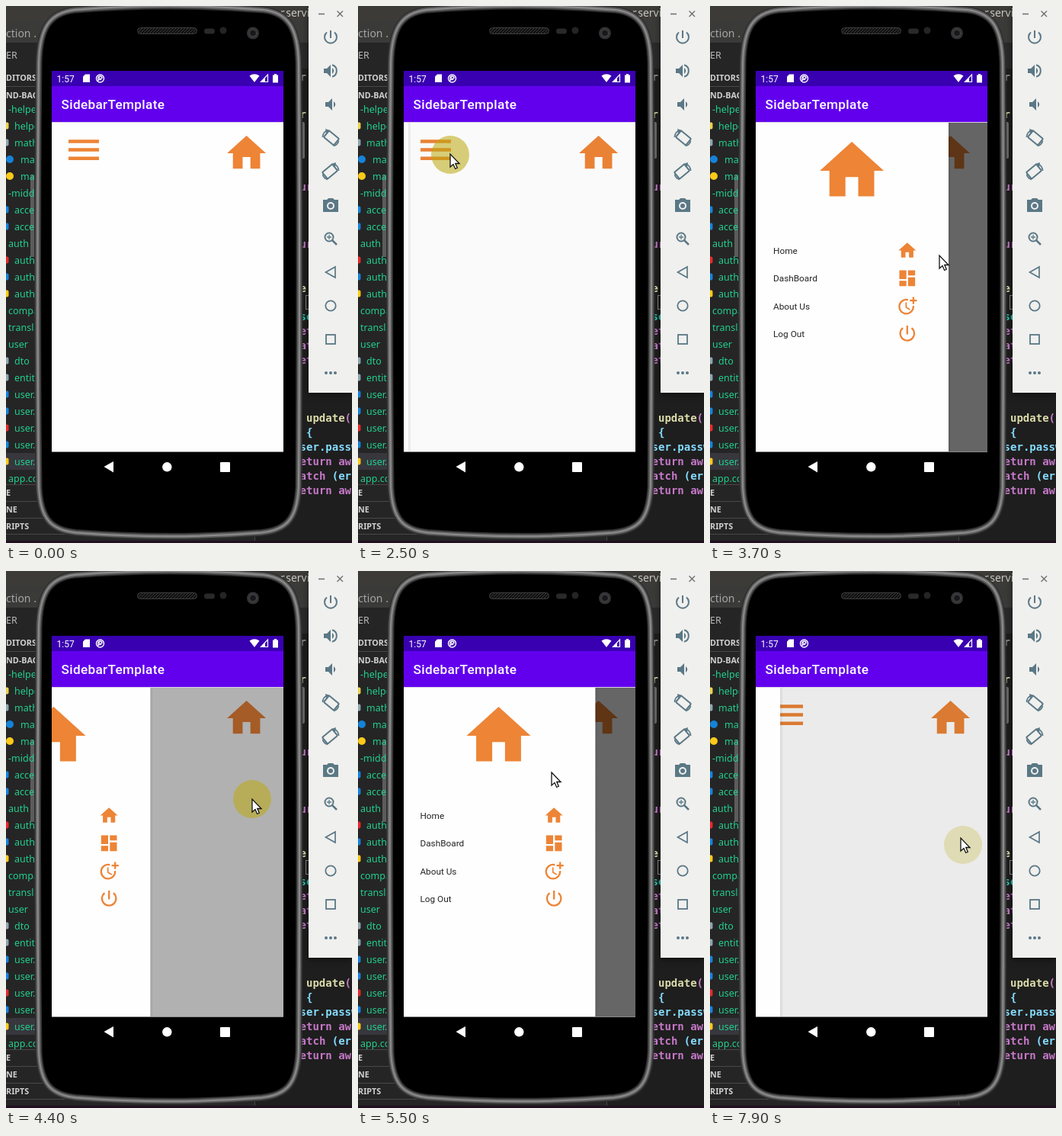
An HTML page that plays this animation: 454x704 px, repeating every 8 s.

```html
<!DOCTYPE html>
<html lang="en">
<head>
<meta charset="utf-8">
<title>Sidebar demo</title>
<style>
html, body { margin: 0; width: 100%; height: 100%; overflow: hidden; background: #1e1e1e; }
svg { display: block; }
text { white-space: pre; }
.tree { font: 12.5px "Noto Sans", "Open Sans", sans-serif; fill: #22d08c; }
.head { font: bold 10.8px "Noto Sans", "Open Sans", sans-serif; fill: #d0d0d0; }
.bar { font: 14px "Noto Sans", "Open Sans", sans-serif; fill: #a5a5a2; }
.code { font: bold 14px "DejaVu Sans Mono", monospace; }
.app { font: 11.8px Roboto, sans-serif; fill: #242424; }
.tool { fill: none; stroke: #5b7886; stroke-width: 2; }
.tool .solid { fill: #5b7886; stroke: none; }
.orange { fill: #ed8436; }
#toolbar { filter: drop-shadow(0 2px 5px rgba(0, 0, 0, .5)); }
</style>
</head>
<body>
<svg width="454" height="704" viewBox="0 0 454 704">
  <defs>
    <clipPath id="page"><rect x="60" y="152" width="304" height="432"/></clipPath>
    <linearGradient id="shade">
      <stop offset="0" stop-opacity=".1"/><stop offset="1" stop-opacity="0"/>
    </linearGradient>
    <pattern id="mesh" width="4" height="4" patternUnits="userSpaceOnUse">
      <rect width="4" height="4" fill="#111"/><path d="M0 4L4 0" stroke="#3c3c3c"/>
    </pattern>
    <path id="home" d="M10 20v-6h4v6h5v-8h3L12 3 2 12h3v8z"/>
    <path id="body" d="M43 75C44 30 56 9 90 5Q214-5 338 5C371 9 383 30 384 75Q386 350 384 630C382 674 367 687 335 690.500Q214 700 92 690.500C60 687 45 674 43 630Q40 350 43 75Z"/>
  </defs>

  <g id="editor">
    <rect width="454" height="704" fill="#1e1e1e"/>
    <rect y="48" width="327" height="656" fill="#252526"/>
    <rect width="454" height="20" fill="#3c3b37"/>
    <rect y="20" width="454" height="28" fill="#3a3a39"/>
    <rect x="327" y="48" width="127" height="34" fill="#2a2a2b"/>
    <rect y="586" width="327" height="22" fill="#37373d"/>
    <path d="M0 105.500H60M0 627.500H60M0 649.500H60M0 671.500H60M0 692.500H327" stroke="#484848"/>
    <path d="M326.500 690V701" stroke="#444"/>
    <rect y="701" width="454" height="3" fill="#21101f"/>
    <rect x="32" y="222" width="5" height="107" fill="#5c5c5c"/>
    <text class="bar" x="352" y="14" style="fill:#c9c7c2">er.service</text>
    <text class="bar" x="0" y="41">ction .</text>
    <rect x="393.500" y="379.500" width="9" height="18" fill="none" stroke="#888"/>
  </g>

  <g id="phone">
    <rect x="386" y="152" width="6" height="48" rx="2" fill="#686868"/>
    <use href="#body"/>
    <g fill="none">
      <use href="#body" stroke="#303030" stroke-width="9"/>
      <use href="#body" stroke="#626262" stroke-width="5.500"/>
      <use href="#body" stroke="#8c8c8c" stroke-width="2"/>
    </g>
    <rect x="172.500" y="28.500" width="78" height="8" rx="4" fill="url(#mesh)" stroke="#3d3d3d"/>
    <rect x="260" y="29.500" width="14" height="7" rx="3.500" fill="#292929"/>
    <circle cx="285" cy="32" r="4.500" fill="#242424"/>
    <circle cx="324" cy="35.500" r="8" fill="#333"/>
    <circle cx="324" cy="35.500" r="4.500" fill="#17191c" stroke="#4c4c4c"/>
    <rect x="60" y="85" width="304" height="20" fill="#3900b1"/>
    <rect x="60" y="105" width="304" height="47" fill="#6200ee"/>
    <rect x="60" y="152" width="304" height="432" fill="#fefefe"/>
    <g fill="#fff">
      <text x="66.500" y="99.500" font-family="Roboto, sans-serif" font-size="12">1:57</text>
      <path d="M104 89.500h6v10.500h-9v-7.500z"/>
      <circle cx="123.500" cy="95" r="5" fill="none" stroke="#fff" stroke-width="1.400"/>
      <path d="M121 97.500v-3a2.500 2.500 0 0 1 5 0l-2 1zM121 93l4 4" fill="none" stroke="#fff" stroke-width="1.300"/>
      <path d="M319.500 91.500Q326 87 332.500 91.500L326 100Z"/>
      <path d="M334.500 99.500L343.500 90V99.500Z" fill="none" stroke="#fff" stroke-width="1.200"/>
      <path d="M334 100L340 94V100Z"/>
      <path d="M350 90.500h2v-1.500h3v1.500h2v10h-7z"/>
      <text x="72.500" y="135" font-family="Roboto, sans-serif" font-weight="500" font-size="17.200" letter-spacing=".32">SidebarTemplate</text>
      <path d="M128.500 604L141 597V611.500Z"/>
      <circle cx="211.300" cy="604.300" r="6.200"/>
      <rect x="281" y="598" width="13" height="13" rx="1"/>
    </g>
    <g clip-path="url(#page)">
      <g class="orange">
        <path d="M82 175.200h40v4.500h-40zm0 11.100h40v4.500h-40zm0 11.100h40v4.500h-40z"/>
        <use href="#home" transform="translate(285 162.300) scale(2.550)"/>
      </g>
      <rect id="scrim" x="60" y="152" width="304" height="432"/>
      <g id="drawer">
        <rect x="313" y="152" width="4" height="432" fill="url(#shade)"/>
        <rect x="60" y="152" width="253" height="432" fill="#fefefe"/>
        <use class="orange" href="#home" transform="translate(135.700 165.500) scale(4.200)"/>
      </g>
    </g>
    <path d="M60 152.500H364" stroke="#d9d0e6"/>
    <path d="M60 584.500H364" stroke="#8a8a8a"/>
  </g>

  <g id="toolbar">
    <rect x="397" width="57" height="507" fill="#f0f0ee"/>
    <path d="M410 10.500H418M434.500 6.500L442 14M442 6.500L434.500 14" stroke="#6c6c6c" stroke-width="1.300"/>
  </g>

  <circle id="tap" r="25" fill="#bcaa10"/>
  <path id="cursor" d="M0 0V17L4 13.500 6.700 19.500 9.300 18.300 6.800 12.500H12Z" fill="#fff" stroke="#111" stroke-width="1.300"/>
</svg>
<script>
const $ = id => document.getElementById(id);
const add = (id, markup) => $(id).insertAdjacentHTML('beforeend', markup);
const label = (cls, x, y, str, fill) =>
  `<text class="${cls}" x="${x}" y="${y}"${fill ? ` style="fill:${fill}"` : ''}>${str}</text>`;

// File tree: indent level, icon colour, name
const blue = '#1583d8', red = '#e32b2b', gold = '#ffca18', grey = '#90a4ae';
const tree = [
  [0, '', '-helpers'], [1, '#e8d44d', 'helper'], [1, grey, 'math'], [2, blue, 'math'], [2, gold, 'math'],
  [0, '', '-middle'], [1, blue, 'access'], [1, blue, 'access'], [0, '', 'auth'], [1, red, 'auth.c'],
  [1, blue, 'auth.m'], [1, gold, 'auth.s'], [0, '', 'compan'], [0, '', 'translate'], [0, '', 'user'],
  [1, grey, 'dto'], [1, grey, 'entities'], [1, blue, 'user.c'], [1, blue, 'user.d'], [1, red, 'user.c'],
  [1, blue, 'user.m'], [1, gold, 'user.s'], [0, '', 'app.co']
];
tree.forEach(([level, color, name], i) => {
  const y = 135 + i * 22, x = 3 + level * 8;
  if (color && level === 2) add('editor', `<circle cx="5" cy="${y}" r="5" fill="${color}"/>`);
  else if (color) add('editor', `<rect x="-6" y="${y - 4.5}" width="9.5" height="9" rx="2" fill="${color}"/>`);
  add('editor', label('tree', x, y + 4.5, name));
});
add('editor', label('tree', 0, 69, 'ER', '#bbb'));
[['DITORS', 94], ['ND-BACK', 117], ['E', 638], ['NE', 660], ['RIPTS', 682]]
  .forEach(([s, y]) => add('editor', label('head', 0, y + 4, s)));

// Code lines: column, centre y, colour, text
const pink = '#c678c8', cyan = '#86dcff', pale = '#dcdcaa';
[
  [0, 93, '#999', 'r.'], [0, 142, pale, 'r'], [0, 212, '#bbb', ' .'], [0, 237, pink, 'ur'], [0, 290, '#bbb', ' .'],
  [0, 312, pink, 'ur'], [0, 370, pale, 'e'], [0, 407, '#2fc5b0', 'se'], [0, 426, pink, 'et'],
  [0, 445, pink, 'at'], [0, 464, pink, 'et'], [1, 540, pale, 'update'], [7, 540, pink, '('], [8, 540, cyan, 'i'],
  [1, 559, cyan, '{'], [0, 578, cyan, 'ser.passw'], [0, 597, pink, 'eturn awa'],
  [0, 616, pink, 'atch'], [5, 616, cyan, '(err'], [0, 635, pink, 'eturn awa']
].forEach(([col, y, fill, s]) => add('editor', label('code', 385.6 + col * 8.43, y + 5, s, fill)));

// Emulator buttons, each centred on 0,0
const power = '<path d="M0-9V1M-5-6.500A8 8 0 1 0 5-6.500"/>';
const speaker = '<path class="solid" d="M-9-3h4l5-5v16l-5-5h-4z"/>';
const near = '<path class="solid" d="M2-4Q6.500 0 2 4z"/>';
const turn = '<rect x="-5.500" y="-8.500" width="11" height="17" rx="1" transform="translate(1 0) rotate(-50)"/>' +
  '<path d="M-10.500-1Q-10.500-7-5-9.500M10.500 4Q9 9 4 10.500" stroke-width="1.700"/>' +
  '<path class="solid" d="M-7-12L-1-10-6-6z"/>';
[
  power,
  speaker + near + '<path d="M2-7.700A8 8 0 0 1 2 7.700"/>',
  `<g transform="translate(2)">${speaker + near}</g>`,
  turn,
  `<g transform="scale(-1 1)">${turn}</g>`,
  '<path class="solid" d="M-3-9h6l2 2h5v16h-20v-16h5z"/><circle cy="1" r="4" stroke="#f0f0ee"/>',
  '<circle cx="-2" cy="-2" r="5.500"/><path d="M2 2L8 8" stroke-width="2.500"/><path d="M-5-2H1M-2-5V1" stroke-width="1.300"/>',
  '<path d="M-6.500 0L6-7V7Z" stroke-width="1.700"/>',
  '<circle r="6.700" stroke-width="1.800"/>',
  '<rect x="-6" y="-6" width="12" height="12" stroke-width="1.800"/>',
  '<g class="solid"><circle cx="-6" r="2"/><circle r="2"/><circle cx="6" r="2"/></g>'
].forEach((art, i) => add('toolbar', `<g class="tool" transform="translate(426 ${41 + i * 44})">${art}</g>`));

// Drawer rows, icons on a 24 unit grid
[
  ['Home', '<use href="#home"/>'],
  ['DashBoard', '<path d="M3 13h8V3H3zm0 8h8v-6H3zm10 0h8V11h-8zm0-18v6h8V3z"/>'],
  ['About Us', '<path d="M13 5.200A8 8 0 1 0 18.900 12" fill="none" stroke="#ed8436" stroke-width="2"/>' +
    '<path d="M10 8v6l4.700 2.900.8-1.200-4-2.400V8zM20 5V2h-2v3h-3v2h3v3h2V7h3V5z"/>'],
  ['Log Out', '<path d="M12 3V13M7 5.700A8 8 0 1 0 17 5.700" fill="none" stroke="#ed8436" stroke-width="2"/>']
].forEach(([name, icon], i) => {
  const y = 320.5 + i * 36.3;
  add('drawer', label('app', 83, y + 4.6, name) +
    `<g class="orange" transform="translate(245 ${y - 13.8}) scale(1.15)">${icon}</g>`);
});

const LOOP = 8000, STEP = 100, WIDTH = 253, SETTLE = 470;
// Cursor path: time, x, y
const path = [
  [500, 441, 305], [700, 372, 205], [800, 320, 112], [1000, 184, 172], [1150, 230, 230], [1300, 292, 265],
  [1400, 270, 256], [1600, 175, 215], [1800, 118, 188], [1900, 121, 194], [3100, 121, 194],
  [3300, 160, 380], [3450, 215, 482], [3600, 275, 400], [3700, 301, 327], [3800, 313, 308],
  [4000, 321, 299], [4100, 323, 299], [4500, 323, 299], [4800, 200, 235], [5100, 106, 193],
  [5200, 106, 193], [5400, 190, 236], [5500, 254, 264], [6000, 262, 320], [6400, 200, 480],
  [6600, 262, 430], [6900, 256, 231], [7100, 312, 350], [7200, 325, 375], [7400, 332, 359],
  [7800, 332, 359], [7900, 329, 350]
];
const slides = [[2497.7, 1], [4341, 0], [5201, 1], [7741, 0]];
const taps = [[2400, 121, 195], [4300, 323, 299], [5200, 106, 194], [7700, 332, 359]];

function cursorAt(t) {
  const i = path.findIndex(p => p[0] > t);
  if (i < 0) return path[path.length - 1].slice(1);
  const [a, b] = [path[i - 1], path[i]], k = (t - a[0]) / (b[0] - a[0]);
  return [1, 2].map(n => Math.round(a[n] + (b[n] - a[n]) * k));
}

function openness(t) {
  const slide = slides.filter(s => s[0] <= t).pop();
  if (!slide) return 0;
  const left = Math.max(0, 1 - (t - slide[0]) / SETTLE) ** 5;
  return slide[1] ? 1 - left : left;
}

function draw(t) {
  const open = openness(t);
  $('drawer').setAttribute('transform', `translate(${(open - 1) * WIDTH})`);
  $('drawer').style.display = open > 0 ? '' : 'none';
  $('scrim').setAttribute('opacity', 0.6 * open);

  const tap = taps.find(([at]) => t >= at && t < at + 3 * STEP);
  $('tap').setAttribute('opacity', tap ? 0.85 - 0.3 * (t - tap[0]) / STEP : 0);
  if (tap) $('tap').setAttribute('transform', `translate(${tap[1]} ${tap[2]})`);

  const shown = t >= path[0][0];
  $('cursor').style.display = shown ? '' : 'none';
  if (shown) $('cursor').setAttribute('transform', `translate(${cursorAt(t)})`);
}

const start = performance.now();
function tick() {
  const t = (performance.now() - start) % LOOP;
  draw(Math.floor(t / STEP) * STEP);
  requestAnimationFrame(tick);
}
tick();
</script>
</body>
</html>
```
